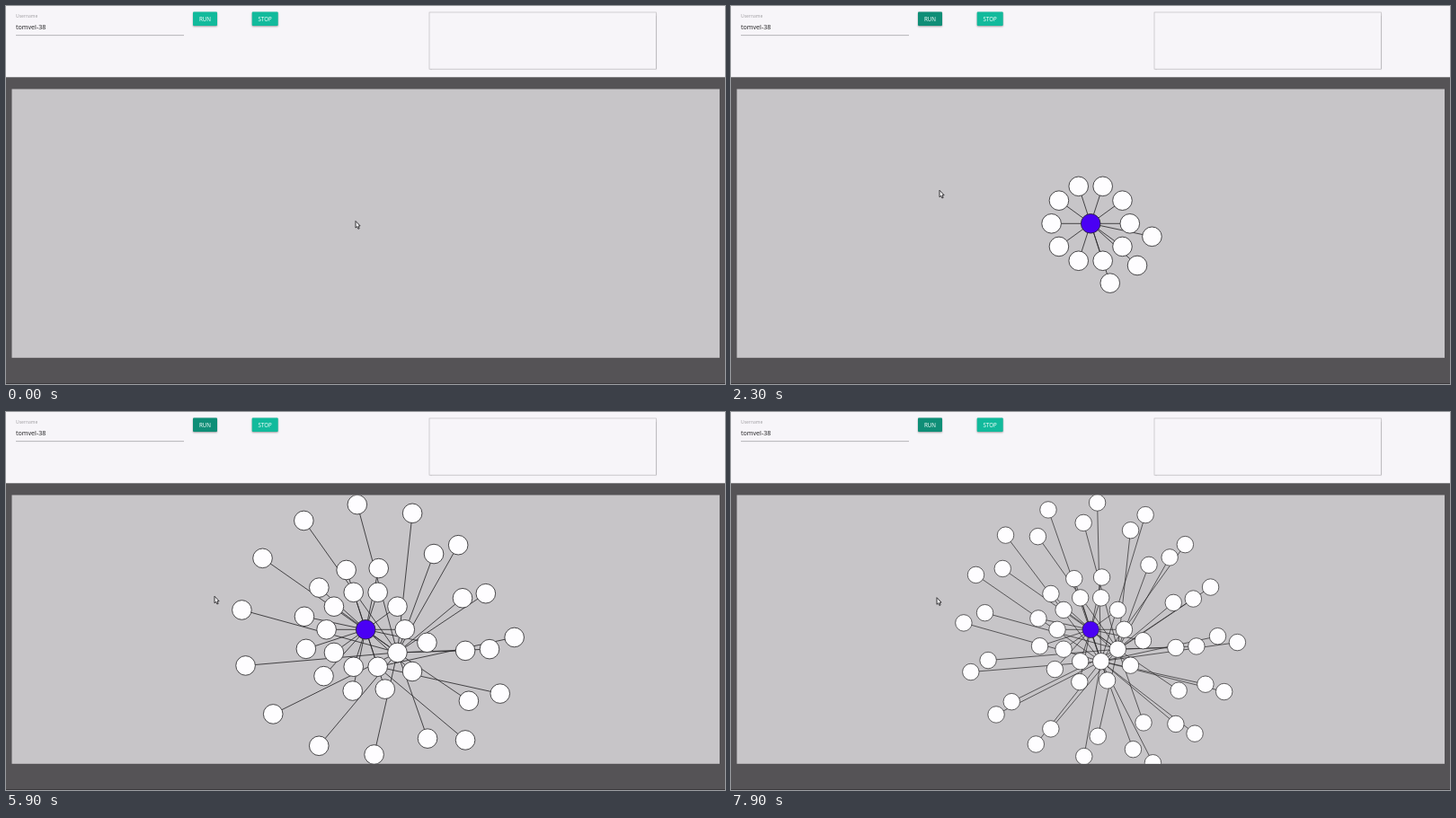
An HTML page with a canvas for the animation above (8000 ms loop, 800 px wide and 421 px high).

```html
<!DOCTYPE html>
<html lang="en">
<head>
<meta charset="utf-8">
<title>Follower graph</title>
<style>
  html, body { margin: 0; width: 100%; height: 100%; overflow: hidden; background: #f7f5f9; }
  canvas { display: block; }
</style>
</head>
<body>
<canvas id="stage" width="800" height="421"></canvas>
<script>
const ctx = document.getElementById('stage').getContext('2d');
const LOOP = 8000;
const STEP = 100;
const CENTER = { x: 400.2, y: 242.3 };
const UNIT = 8.72;
const NODE_RADIUS = 10.8;
const FONT = '"Noto Sans", "Open Sans", sans-serif';
const VIEW = { x: 6.5, y: 92.5, w: 787.5, h: 299.3 };

// Rings: distance in units, first angle, angle step (degrees), node count
const RINGS = [
  [5, 36, 36, 10],
  [8, 12, 30, 10],
  [13, 312, 30, 3],
  [16, 9, 360 / 14, 14],
  [19, 3, 22.5, 16],
  [22, 5, 20, 4]
];

// Batches of nodes: first node number, time of its arrival
const BATCHES = [
  [1, 900], [2, 1100], [7, 1700], [24, 3300], [25, 3700],
  [26, 4000], [30, 4700], [38, 5600], [39, 5800], [52, 7200]
];

const ROOT = { x: 0, y: 0, born: 800 };
const nodes = [ROOT];

function birthTime(id) {
  const [first, start] = BATCHES.filter(batch => batch[0] <= id).pop();
  return start + (id - first) * STEP;
}

for (const [distance, start, step, count] of RINGS) {
  for (let k = 0; k < count; k++) {
    const id = nodes.length;
    const angle = (start + k * step) * Math.PI / 180;
    nodes.push({
      x: Math.cos(angle) * distance * UNIT,
      y: Math.sin(angle) * distance * UNIT,
      born: birthTime(id),
      parent: nodes[id <= 20 ? 0 : id <= 37 ? 1 : 2]
    });
  }
}

const clamp01 = v => Math.max(0, Math.min(1, v));
const progress = (t, from, to) => clamp01((t - from) / (to - from));
const smooth = p => p * p * (3 - 2 * p);
const mix = (a, b, p) => a + (b - a) * p;

function text(label, x, y, size, color, align = 'left') {
  ctx.font = `${size}px ${FONT}`;
  ctx.fillStyle = color;
  ctx.textAlign = align;
  ctx.fillText(label, x, y);
}

function shadow(color, blur, dx, dy) {
  ctx.shadowColor = color;
  ctx.shadowBlur = blur;
  ctx.shadowOffsetX = dx;
  ctx.shadowOffsetY = dy;
}

function button(label, x, width, color) {
  ctx.save();
  shadow('rgba(0,0,0,0.35)', 2, 0, 1);
  ctx.fillStyle = color;
  ctx.beginPath();
  ctx.roundRect(x, 6.5, width, 15.5, 1);
  ctx.fill();
  ctx.restore();
  text(label, x + width / 2, 16.7, 6.2, '#f4fffc', 'center');
}

function drawPage(t) {
  ctx.fillStyle = '#f7f5f9';
  ctx.fillRect(0, 0, 800, 421);

  text('Username', 11, 13, 5, '#a4a2a6');
  text('tomvel-38', 11, 25.6, 7.1, '#2a292b');
  ctx.fillStyle = '#a6a4a8';
  ctx.fillRect(11, 32.3, 187, 0.8);

  const press = progress(t, 700, 1000);
  const runColor = `rgb(${mix(18, 15, press)},${mix(186, 142, press)},${mix(156, 119, press)})`;
  button('RUN', 208, 27, runColor);
  button('STOP', 273.7, 29, '#12ba9c');

  ctx.save();
  shadow('rgba(0,0,0,0.5)', 1.5, 0.8, 0.8);
  ctx.fillStyle = '#f7f5f9';
  ctx.fillRect(471, 7, 252.5, 63.2);
  ctx.restore();
  ctx.strokeStyle = '#c0bec2';
  ctx.lineWidth = 0.7;
  ctx.strokeRect(471, 7, 252.5, 63.2);

  ctx.fillStyle = '#555356';
  ctx.fillRect(0, 79.3, 800, 342);
  ctx.fillStyle = '#3b393c';
  ctx.fillRect(0, 420, 800, 1);
  ctx.fillStyle = '#c7c5c8';
  ctx.fillRect(VIEW.x, VIEW.y, VIEW.w, VIEW.h);
}

function drawGraph(t) {
  const zoom = t >= 7900 ? 0.854 : t >= 7800 ? 0.924 : 1;
  const visible = nodes.filter(node => node.born <= t);

  ctx.save();
  ctx.beginPath();
  ctx.rect(VIEW.x, VIEW.y, VIEW.w, VIEW.h);
  ctx.clip();
  ctx.translate(CENTER.x, CENTER.y);
  ctx.scale(zoom, zoom);
  ctx.lineWidth = 0.85;
  ctx.strokeStyle = '#2b2a2c';

  ctx.beginPath();
  for (const { x, y, parent } of visible) {
    if (!parent) continue;
    ctx.moveTo(parent.x, parent.y);
    ctx.lineTo(x, y);
  }
  ctx.stroke();

  for (const node of visible) {
    ctx.beginPath();
    ctx.arc(node.x, node.y, NODE_RADIUS, 0, Math.PI * 2);
    ctx.fillStyle = node === ROOT ? '#4a00f4' : '#fefdff';
    ctx.fill();
    ctx.stroke();
  }
  ctx.restore();
}

function drawCursor(t) {
  const toButton = smooth(progress(t, 0, 600));
  const toCanvas = smooth(progress(t, 900, 1500));
  const drift = progress(t, 7700, 7900);
  const x = mix(mix(389, 222, toButton), 232, toCanvas) - 3 * drift;
  const y = mix(mix(239.5, 14, toButton), 205.2, toCanvas) + 1.5 * drift;

  ctx.save();
  ctx.translate(x, y);
  ctx.beginPath();
  ctx.moveTo(0, 0);
  ctx.lineTo(0, 7.6);
  ctx.lineTo(1.7, 6.1);
  ctx.lineTo(2.9, 8.8);
  ctx.lineTo(4.2, 8.2);
  ctx.lineTo(3, 5.6);
  ctx.lineTo(5.1, 5.4);
  ctx.closePath();
  ctx.fillStyle = '#f4f3f5';
  ctx.fill();
  ctx.strokeStyle = '#252426';
  ctx.lineWidth = 0.9;
  ctx.stroke();
  ctx.restore();
}

function render(now) {
  const t = Math.floor((now % LOOP) / STEP) * STEP;
  drawPage(t);
  drawGraph(t);
  drawCursor(t);
  requestAnimationFrame(render);
}

render(0);
</script>
</body>
</html>
```
